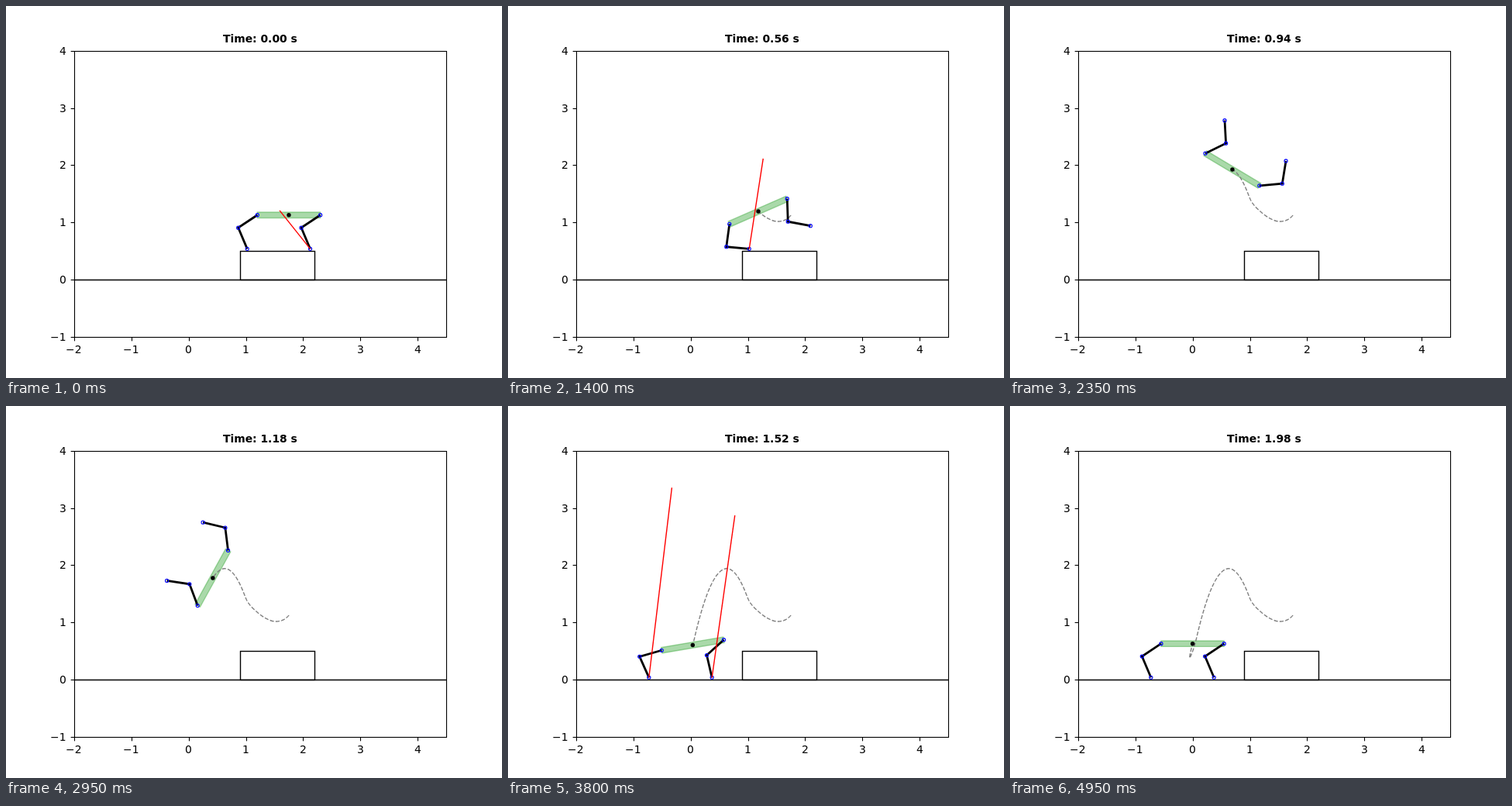
Write an HTML page with a canvas that moves like this. It is 640 by 480 pixels and loops after 5000 ms.

```html
<!DOCTYPE html>
<html lang="en">
<head>
<meta charset="utf-8">
<title>Backflip</title>
<style>
  html, body { margin: 0; width: 100%; height: 100%; overflow: hidden; background: #fff; }
  canvas { display: block; }
</style>
</head>
<body>
<canvas id="stage" width="640" height="480"></canvas>
<script>
const ctx = document.getElementById('stage').getContext('2d');
const UNIT = 73.92, LINK = 0.4, HALF = 0.55, DEG = Math.PI / 180;
const px = x => 235.6 + UNIT * x;
const py = y => 353.28 - UNIT * y;
const snap = v => Math.floor(v + 0.5) + 0.5;

// A torso pose is [x, y, pitch in degrees]; in the air it is a thrown, evenly spinning body
const TAKEOFF = 0.68, TOUCHDOWN = 1.5, APEX = 0.997, GRAVITY = 9.81, SPEED = -1.13, SPIN = 383;

function flight(t) {
  const s = t - APEX;
  return { t, pose: [0.63 + SPEED * s, 1.941 - GRAVITY * s * s / 2, 171 + SPIN * s],
           rate: [SPEED, -GRAVITY * s, SPIN] };
}

const home = { t: 0, pose: [1.75, 1.13, 0], rate: [0, 0, 0] };
const crouch = { t: 0.34, pose: [1.538, 1.018, -4.2], rate: [-1.35, -0.08, 40] };
const push = { t: 0.56, pose: [1.182, 1.194, 23.7], rate: [-1.7, 1.55, 170] };
const squat = { t: 1.61, pose: [-0.051, 0.379, 371], rate: [-0.1, 0, -60] };
const rest = { t: 1.98, pose: [0, 0.63, 360], rate: [0.07, 0.2, 0] };
const launch = [home, crouch, push, flight(TAKEOFF)];
const landing = [flight(TOUCHDOWN), squat, rest];

function between(keys, t) {
  const i = Math.max(1, keys.findIndex(k => k.t >= t));
  const a = keys[i - 1], b = keys[i], span = b.t - a.t;
  return { a, b, span, s: (t - a.t) / span };
}

function torso(t) {
  if (t > TAKEOFF && t < TOUCHDOWN) return flight(t).pose;
  const { a, b, span, s } = between(t <= TAKEOFF ? launch : landing, t);
  const blend = s * s * (3 - 2 * s);
  return a.pose.map((p, i) => p + (b.pose[i] - p) * blend
    + span * s * (1 - s) * ((1 - s) * a.rate[i] - s * b.rate[i]));
}

const polar = ([x, y], deg, r) => [x + r * Math.cos(deg * DEG), y + r * Math.sin(deg * DEG)];
const footBelow = (key, side) => [key.pose[0] + side * HALF - 0.177, key.pose[1] - 0.59];

function hipAt(leg, t) {
  const [x, y, pitch] = torso(t);
  return polar([x, y], pitch, leg.side * HALF);
}

// Joint angles [thigh from torso, knee] that put the foot on a fixed spot
function reach(leg, foot, t) {
  const hip = hipAt(leg, t), dx = foot[0] - hip[0], dy = foot[1] - hip[1];
  const bend = Math.acos(Math.min(1, Math.hypot(dx, dy) / (2 * LINK))) / DEG;
  const thigh = Math.atan2(dy, dx) / DEG - bend - torso(t)[2];
  return [(thigh % 360 + 360) % 360, 2 * bend];
}

function makeLeg(side, off, tucks, thrust, impact) {
  const leg = { side, off, thrust, impact, from: footBelow(home, side), to: footBelow(rest, side) };
  leg.swing = [{ t: off, joints: reach(leg, leg.from, off) }, ...tucks,
               { t: TOUCHDOWN, joints: reach(leg, leg.to, TOUCHDOWN) }];
  return leg;
}

const legs = [
  makeLeg(-1, TAKEOFF, [{ t: 0.94, joints: [216, 75.6] }, { t: 1.18, joints: [216, 69.5] }],
    t => [1.907 * t - 0.824, 3.874 * t - 0.593], 3.314),
  makeLeg(1, 0.46, [{ t: 0.56, joints: [248.3, 77.3] }, { t: 1.18, joints: [229.5, 60.7] }],
    t => [1.055 * t - 0.534, 0.994 * t + 0.67], 2.83)
];

function jointAngles(leg, t) {
  if (t <= leg.off) return reach(leg, leg.from, t);
  if (t >= TOUCHDOWN) return reach(leg, leg.to, t);
  const { a, b, s } = between(leg.swing, t);
  return a.joints.map((v, i) => v + (b.joints[i] - v) * s);
}

function groundForce(leg, t) {
  if (t <= leg.off) return leg.thrust(t);
  if (t < TOUCHDOWN || t >= rest.t) return [0, 0];
  const pulse = 0.14 + 0.86 * Math.exp(-(((t - 1.52) / 0.08) ** 4));
  return [0.4 * pulse, leg.impact * pulse];
}

function line(points, color, width) {
  ctx.beginPath();
  points.forEach(p => ctx.lineTo(...p));
  ctx.strokeStyle = color;
  ctx.lineWidth = width;
  ctx.stroke();
}

const plot = (points, color, width) => line(points.map(([x, y]) => [px(x), py(y)]), color, width);

// Text starts on a whole pixel; align is 0.5 for centred, 1 for right
function text(str, x, y, align, weight = '') {
  ctx.font = `${weight} 13.89px "DejaVu Sans", sans-serif`;
  ctx.fillText(str, Math.round(x - align * Math.ceil(ctx.measureText(str).width)), y);
}

function drawAxes(t) {
  const left = snap(px(-2)), right = snap(px(4.5)), top = snap(py(4)), bottom = snap(py(-1));
  const label = v => String(v).replace('-', '\u2212');
  ctx.fillStyle = ctx.strokeStyle = '#000';
  ctx.lineWidth = 1.11;
  ctx.strokeRect(left, top, right - left, bottom - top);
  for (let v = -2; v <= 4; v++) {
    const x = snap(px(v)), y = snap(py(v));
    line([[x, bottom], [x, bottom + 4.86]], '#000', 1.11);
    text(label(v), px(v), 448, 0.5);
    if (v < -1) continue;
    line([[left, y], [left - 4.86, y]], '#000', 1.11);
    text(label(v), 78, y + 4.5, 1);
  }
  text(`Time: ${t.toFixed(2)} s`, 328, 47, 0.5, 'bold');
  line([[left, 353.5], [right, 353.5]], '#000', 1.39);
  ctx.strokeRect(302.5, 316.5, 96, 37);
}

function drawTorso([x, y, pitch]) {
  ctx.save();
  ctx.translate(px(x), py(y));
  ctx.rotate(-pitch * DEG);
  ctx.beginPath();
  ctx.rect(-HALF * UNIT, -0.05 * UNIT, 2 * HALF * UNIT, 0.1 * UNIT);
  ctx.fillStyle = ctx.strokeStyle = 'rgba(44,160,44,0.4)';
  ctx.lineWidth = 1.39;
  ctx.fill();
  ctx.stroke();
  ctx.restore();
}

function drawLeg(leg, t) {
  const [thigh, bend] = jointAngles(leg, t), angle = torso(t)[2] + thigh;
  const hip = hipAt(leg, t), knee = polar(hip, angle, LINK), foot = polar(knee, angle + bend, LINK);
  plot([hip, knee, foot], '#000', 2.78);
  ctx.strokeStyle = '#00f';
  ctx.lineWidth = 1.1;
  for (const [x, y] of [hip, knee, foot]) {
    ctx.beginPath();
    ctx.arc(px(x), py(y), 2.08, 0, 7);
    ctx.stroke();
  }
  const [fx, fy] = groundForce(leg, t);
  if (fy > 0) plot([foot, [foot[0] + fx, foot[1] + fy]], '#f00', 1.39);
}

function draw(step) {
  const t = step / 50, body = torso(t);
  ctx.fillStyle = '#fff';
  ctx.fillRect(0, 0, 640, 480);
  drawAxes(t);
  drawTorso(body);
  ctx.setLineDash([5.14, 2.22]);
  plot(Array.from({ length: step + 1 }, (_, i) => torso(i / 50)), '#808080', 1.39);
  ctx.setLineDash([]);
  legs.forEach(leg => drawLeg(leg, t));
  ctx.beginPath();
  ctx.arc(px(body[0]), py(body[1]), 2.7, 0, 7);
  ctx.fillStyle = '#000';
  ctx.fill();
}

const began = performance.now();
function tick() {
  draw(Math.floor((performance.now() - began) / 50) % 100);
  requestAnimationFrame(tick);
}
tick();
</script>
</body>
</html>
```
